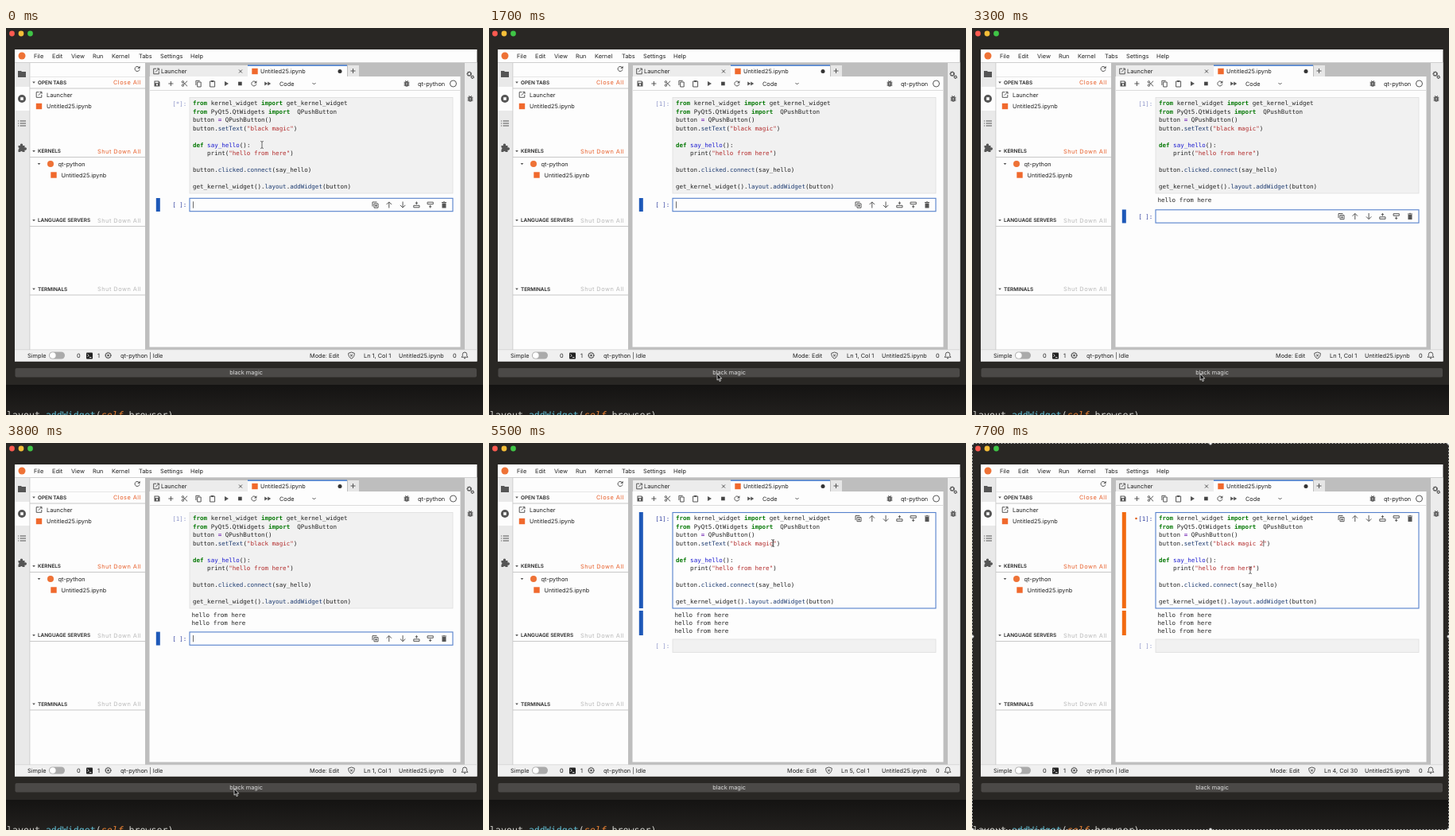
Animation of 600 by 487 pixels, one loop 7800 ms. Source, as an HTML page:

```html
<!DOCTYPE html>
<html lang="en">
<head>
<meta charset="utf-8">
<title>Notebook button demo</title>
<style>
  html, body { margin: 0; width: 100%; height: 100%; overflow: hidden; background: #292724; }
  svg { display: block; width: 600px; height: 487px; }
  text { font: 7.35px Inter, "Open Sans", sans-serif; fill: #222; white-space: pre; text-rendering: geometricPrecision; }
  .mono { font: 7.53px "DejaVu Sans Mono", monospace; }
  .head { font-size: 6.4px; font-weight: 600; }
  .act { letter-spacing: .5px; }
  .k { fill: #087a08; font-weight: bold; }
  .s { fill: #b22a2a; }
  .d { fill: #1a1ad0; }
  .p { fill: #1c3a70; }
  .o { fill: #7a30b8; font-weight: bold; }
  .i { fill: none; stroke: #555; stroke-width: 1; }
  .f { fill: #555; }
</style>
</head>
<body>
<svg id="stage" viewBox="0 0 600 487"></svg>
<script>
const rect = (x, y, w, h, fill, more = '') =>
  `<rect x="${x}" y="${y}" width="${w}" height="${h}" fill="${fill}" ${more}/>`;
const dot = (x, y, r, fill, more = '') => `<circle cx="${x}" cy="${y}" r="${r}" fill="${fill}" ${more}/>`;
const text = (x, y, s, more = '') => `<text x="${x}" y="${y + 2.6}" ${more}>${s}</text>`;
const mono = (x, y, s, more = '') => text(x, y, s, 'class="mono" ' + more);
const span = (c, s) => `<tspan class="${c}">${s}</tspan>`;
const icon = (x, y, name) => `<g transform="translate(${x} ${y})">${icons[name]}</g>`;
const line = d => `<path class="i" d="${d}"/>`;
const solid = d => `<path class="f" d="${d}"/>`;

const icons = {
  folder: solid('M-5-4H-1L0-3H5V4H-5Z'),
  running: dot(0, 0, 5, '#555') + rect(-1.8, -1.8, 3.6, 3.6, '#fff'),
  list: line('M-2.5-3H5M-2.5 0H5M-2.5 3H5M-5-3H-4M-5 0H-4M-5 3H-4'),
  puzzle: solid('M-4.5-3H-2A1.7 1.7 0 1 1 1-3H3.5V-.5A1.7 1.7 0 1 1 3.5 2.5V5H.8A1.5 1.5 0 0 0-2 5H-4.5V2A1.5 1.5 0 0 0-4.5-.8Z'),
  reload: line('M2.4-1.9A3 3 0 1 0 3 .6') + solid('M3.6-3.8V-.4H.3Z'),
  open: line('M0-3.3H-3.3V3.3H3.3V0M-.8 .8L3.2-3.2M1-3.5H3.5V-1'),
  save: solid('M-3.5-3.5H2L3.5-2V3.5H-3.5Z') + rect(-2.4, -2.5, 4, 1.7, '#fff') + dot(0, 1.4, 1.1, '#fff'),
  plus: line('M-3 0H3M0-3V3'),
  cut: line('M-2-1.7L3.3 3.3M-2 1.7L3.3-3.3') + dot(-2.4, -2.2, 1.2, 'none', 'class="i"') + dot(-2.4, 2.2, 1.2, 'none', 'class="i"'),
  copy: line('M-1.5-2H3V4H-1.5ZM-3.3 2V-3.7H1.5'),
  paste: line('M-3-3H3V4H-3Z') + rect(-1.6, -4, 3.2, 2, '#555'),
  run: solid('M-2-3L3 0L-2 3Z'),
  stop: rect(-2.3, -2.3, 4.6, 4.6, '#444'),
  skip: solid('M-4-2.6L0 0L-4 2.6ZM0-2.6L4 0L0 2.6Z'),
  chevron: line('M-2-1L0 1L2-1'),
  fold: solid('M-1.8-1H1.8L0 1.2Z'),
  bug: line('M-3.4-1.7H3.4M-3.4 .3H3.4M-3.4 2.3H3.4M-1.7-3.8L0-2L1.7-3.8') +
    rect(-2.3, -3, 4.6, 6.8, '#555', 'rx="2.3"') + '<path d="M-1-.6H1M-1 1.2H1" stroke="#eee" stroke-width=".7"/>',
  gears: dot(-1.3, -1.3, 2.3, 'none', 'stroke="#444" stroke-width="1.7" stroke-dasharray="1.5 .4"') +
    dot(2.7, 2.7, 1.5, 'none', 'stroke="#444" stroke-width="1.4" stroke-dasharray="1.2 .4"'),
  twin: line('M-1.5-1.5H3.5V3.7H-1.5ZM-3.5 2V-3.5H2M1-.3V2.5M-.4 1.1H2.4'),
  up: line('M0 4V-3.4M-3.2-.4L0-3.6L3.2-.4'),
  down: line('M0-4V3.4M-3.2 .4L0 3.6L3.2 .4'),
  above: line('M-3.6 .8H3.6V3.3H-3.6ZM0-.4V-4M-1.6-2.3H1.6'),
  below: line('M-3.6-3.3H3.6V-.8H-3.6ZM0 .4V4M-1.6 2.3H1.6'),
  trash: solid('M-2.5-2H2.5V4H-2.5ZM-3-3.6H-1L-.5-4.2H.5L1-3.6H3V-2.6H-3Z'),
  shell: rect(-4, -4, 8, 8, '#222', 'rx="1"') + '<path d="M-2.5-2L-.8-.3L-2.5 1.4M0 2H2.5" stroke="#fff" fill="none" stroke-width=".8"/>',
  chip: dot(0, 0, 3.2, 'none', 'class="i"') + dot(0, 0, 3.8, 'none', 'stroke="#555" stroke-dasharray="1 1"') + rect(-1.2, -1.2, 2.4, 2.4, '#555'),
  shield: line('M0-4L3.8-2.7C3.8 1 2.5 3 0 4C-2.5 3-3.8 1-3.8-2.7ZM-1.5-1.3L1.5 1.5M1.5-1.3L-1.5 1.5'),
  bell: line('M-4 2.2H4L2.7 .6V-1.3A2.7 2.7 0 0 0-2.7-1.3V.6ZM-1 3.7H1')
};

const book = (x, y) => rect(x - 3.7, y - 3.7, 7.4, 7.4, '#f0692d');
const section = (y, title, action, x, color) =>
  rect(30, y + 7, 145, 1, '#c8c8c8') + icon(35, y, 'fold') +
  text(40, y - .3, title, 'class="head"') + text(x, y, action, `class="act" style="fill:${color}"`);
const orange = '#e8602c', grey = '#b9b9b9', paper = '#fdfdfd';

const chrome = [
  '<linearGradient id="shade" x2="0" y2="1"><stop stop-color="#141312"/><stop offset="1" stop-color="#22201e"/></linearGradient>',
  rect(0, 0, 600, 487, '#292724'), rect(0, 449, 600, 38, 'url(#shade)'),
  dot(7.5, 7, 3.4, '#fb5a50'), dot(19, 7, 3.4, '#f6be38'), dot(30.5, 7, 3.4, '#3fc546'),
  rect(11, 27, 581.5, 392.5, paper),
  dot(20, 35, 4.5, '#ee7236'),
  ...[[35, 'File'], [58, 'Edit'], [82, 'View'], [109, 'Run'], [133, 'Kernel'], [167, 'Tabs'], [194, 'Settings'], [232, 'Help']]
    .map(([x, s]) => text(x, 35.5, s)),
  rect(11, 43, 581.5, 1, '#cfcfcf'), rect(11, 44, 19, 361, '#e9e9e9'), rect(11, 74, 19, 30, paper),
  icon(20, 58, 'folder'), icon(20, 89, 'running'), icon(20, 120, 'list'), icon(20, 151, 'puzzle'),
  rect(29.5, 44, .8, 361, '#c8c8c8'),
  icon(165, 51.5, 'reload'), rect(30, 61, 145, .7, '#ddd'),
  section(68.5, 'OPEN TABS', 'Close All', 135, orange),
  section(155, 'KERNELS', 'Shut Down All', 115, orange),
  section(242, 'LANGUAGE SERVERS', 'Shut Down All', 115, grey),
  section(328.5, 'TERMINALS', 'Shut Down All', 115, grey),
  icon(41.5, 84, 'open'), text(51, 84.5, 'Launcher'), book(41.5, 98.5), text(51, 98.5, 'Untitled25.ipynb'),
  icon(41.5, 171, 'fold'), dot(56, 171, 4, '#ee7236'), text(65.5, 171, 'qt-python'),
  book(60, 185), text(69.5, 185, 'Untitled25.ipynb'),
  rect(175, 44, 402, 361, '#bebebe'), rect(180.5, 61, 391, 340.5, paper),
  rect(181, 47, 123, 14, '#ececec'), rect(304, 47, 125, 15, paper), rect(304, 46.5, 125, 1.3, '#2f6fd0'),
  rect(430, 47, 14, 14, '#e6e6e6'),
  icon(189, 54.5, 'open'), text(195, 54.5, 'Launcher'), line('M293 52.5l4 4m0-4l-4 4'),
  book(313, 54.5), text(320, 54.5, 'Untitled25.ipynb'), dot(420, 54.5, 2.5, '#333'), icon(436.5, 54, 'plus'),
  ...['save', 'plus', 'cut', 'copy', 'paste', 'run', 'stop', 'reload', 'skip']
    .map((n, i) => icon(190 + 17.4 * i, 70, n)),
  text(344, 70, 'Code'), icon(387.5, 70, 'chevron'), icon(504, 70, 'bug'),
  text(518, 70, 'qt-python'), dot(562.5, 70, 4, 'none', 'class="i"'), rect(181, 78, 390, .8, '#d4d4d4'),
  rect(577, 44, 15.5, 361, '#ececec'), icon(584, 59, 'gears'), icon(584, 89, 'bug'),
  rect(11, 405, 581.5, 14.5, '#f0f0f0'), rect(11, 404.5, 581.5, .7, '#cfcfcf'),
  text(27, 412, 'Simple'), rect(54, 407.5, 20, 9, '#aaa', 'rx="4.5"'), dot(58.8, 412, 3.8, '#fff'),
  text(89, 412, '0'), icon(105, 412.5, 'shell'), text(115, 412, '1'), icon(128.5, 412, 'chip'),
  text(144, 412, 'qt-python | Idle'), text(494, 412, 'Untitled25.ipynb'), text(562, 412, '0'), icon(577, 412, 'bell'),
  rect(11.5, 428, 580.5, 11.5, '#4b4947', 'rx="2"'),
  text(302, 433.5, 'black magic', 'text-anchor="middle" style="fill:#ddd"'),
  `<text x="1" y="491.3" style="font:11.6px 'DejaVu Sans Mono',monospace;fill:#d5d5d0">layout.<tspan fill="#62bfd4">addWidget</tspan>(<tspan fill="#ef8534" font-style="italic">self</tspan>.browser)</text>`
].join('');

const codeLines = label => [
  `${span('k', 'from')} kernel_widget ${span('k', 'import')} get_kernel_widget`,
  `${span('k', 'from')} PyQt5.QtWidgets ${span('k', 'import')}  QPushButton`,
  `button ${span('o', '=')} QPushButton()`,
  `button.${span('p', 'setText')}(${span('s', `"${label}"`)})`,
  '',
  `${span('k', 'def')} ${span('d', 'say_hello')}():`,
  `    print(${span('s', '"hello from here"')})`,
  '',
  `button.${span('p', 'clicked')}.${span('p', 'connect')}(say_hello)`,
  '',
  `get_kernel_widget().${span('p', 'layout')}.${span('p', 'addWidget')}(button)`
];

const cell = (y, h, active) => active
  ? rect(231, y, 331, h, paper, 'stroke="#5580cc" stroke-width="1.1"')
  : rect(231, y, 331, h, '#f1f1f1', 'stroke="#dedede" stroke-width=".8"');
const prompt = (y, s, active) => mono(227.3, y, s, `text-anchor="end" style="fill:#303f9f;opacity:${active ? 1 : .55}"`);
const tools = y => ['twin', 'up', 'down', 'above', 'below', 'trash'].map((n, i) => icon(464.5 + 17.3 * i, y, n)).join('');
const caret = (x, y) => rect(x, y - 4.2, .8, 8.4, '#444');

// Pointer stops: time, x, y
const path = [[0, 322, 147], [100, 322, 147], [800, 297, 425], [1300, 289, 440], [4000, 289, 440], [4400, 421, 230],
  [4800, 372, 137], [5200, 357, 126], [5800, 357, 126], [6400, 350, 173], [7000, 350, 173], [7500, 350, 160], [7800, 350, 160]];
function pointerAt(t) {
  const i = path.findIndex((p, j) => j && t < p[0]);
  const [a, b] = [path[i - 1], path[i]];
  let u = (t - a[0]) / (b[0] - a[0]);
  u = u * u * (3 - 2 * u);
  return [a[1] + (b[1] - a[1]) * u, a[2] + (b[2] - a[2]) * u];
}
function pointer(t) {
  const [x, y] = pointerAt(t);
  const inCode = y > 88 && y < 208;
  const shape = inCode
    ? '<path d="M-1.8-4.5Q0-4.5 0-3.2Q0-4.5 1.8-4.5M0-3.2V3.2M-1.8 4.5Q0 4.5 0 3.2Q0 4.5 1.8 4.5" fill="none" stroke="#444" stroke-width=".8"/>'
    : '<path d="M-2-5V3.2L-.2 1.6L1.1 4.6L2.5 4L1.2 1.1H3.8Z" fill="#111" stroke="#fff" stroke-width=".7"/>';
  return `<g transform="translate(${x} ${y})">${shape}</g>`;
}

function notebook(t) {
  const outputs = [2900, 3600, 3900].filter(c => t >= c).length;
  const editing = t >= 4700, dirty = t >= 6200;
  const label = 'black magic' + (dirty ? ' ' : '') + (t >= 6900 ? '2' : '');
  const y2 = outputs ? 237 + 9.1 * (outputs - 1) : 222.5;
  const bar = dirty ? '#f26a10' : '#1d58b8';
  const out = [
    cell(87.5, 120.5, editing), prompt(95, t < 300 ? '[*]:' : '[1]:', editing),
    ...codeLines(label).map((s, i) => mono(235, 94.8 + 10.45 * i, s)),
    ...Array.from({ length: outputs }, (_, i) => mono(233.5, 216 + 10 * i, 'hello from here')),
    cell(y2 - 8.2, 16.4, !editing), prompt(y2, '[ ]:', !editing), tools(editing ? 95 : y2)
  ];
  if (editing) {
    out.push(rect(188.8, 87, 5, 121, bar), rect(188.8, 211, 5, 31, bar));
    if (dirty) out.push(dot(206.5, 95, 1.3, '#e0601c'));
    if (t >= 5300) out.push(caret(235 + (16 + label.length) * 4.533, 126.2));
  } else {
    out.push(rect(188.8, y2 - 8.5, 5, 17, bar));
    if ((t + 450) % 1060 < 530) out.push(caret(235, y2));
  }
  return out.join('');
}

function status(t) {
  const dx = t >= 5400 ? -7 : 0;
  const where = t < 4700 ? '1, Col 1' : t < 5600 ? '5, Col 1' : '4, Col ' + (t < 6500 ? 28 : t < 6900 ? 29 : 30);
  return text(382 + dx, 412, 'Mode: Edit') + icon(434.5 + dx, 412, 'shield') + text(450 + dx, 412, 'Ln ' + where);
}

function selection(t) {
  if (t < 6800) return '';
  let s = rect(.5, .5, 599, 486, 'none', 'stroke="#bbb" stroke-dasharray="2 2"');
  for (const x of [.5, 300, 599.5]) for (const y of [.5, 243.5, 486.5])
    if (x !== 300 || y !== 243.5) s += dot(x, y, 2, '#eee', 'stroke="#555" stroke-width=".6"');
  return s;
}

const stage = document.getElementById('stage');
stage.innerHTML = chrome + '<g id="live"></g>';
const live = document.getElementById('live');
let shown = -1;
function draw() {
  const t = Math.floor(performance.now() % 7800 / 100) * 100;
  if (t !== shown) {
    live.innerHTML = notebook(t) + status(t) + pointer(t) + selection(t);
    shown = t;
  }
  requestAnimationFrame(draw);
}
draw();
</script>
</body>
</html>
```
